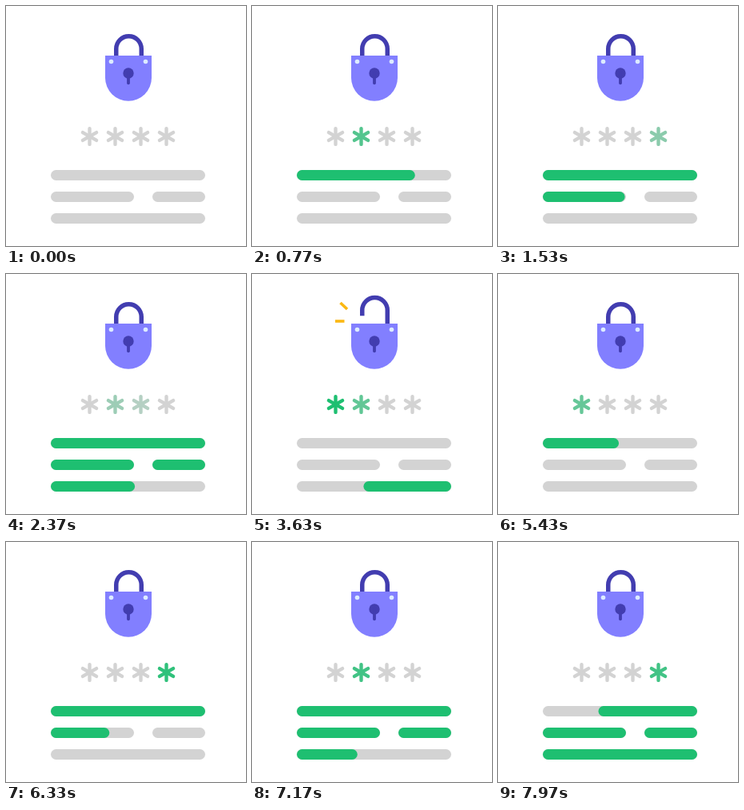
An HTML page with a canvas that plays this animation: 300x300 px, repeating every 8 s.

```html
<!DOCTYPE html>
<html lang="en">
<head>
<meta charset="utf-8">
<title>Password unlock</title>
<style>
  html, body { margin: 0; width: 100%; height: 100%; overflow: hidden; background: #fff; }
  canvas { display: block; width: 300px; height: 300px; }
</style>
</head>
<body>
<canvas id="stage"></canvas>
<script>
const LOOP = 8000, CYCLE = 149;
const GRAY = [211, 211, 211], GREEN = [30, 191, 113];
const BODY = '#827fff', DARK = '#423db0', RIVET = '#dcebff', SPARK = '#fbb813';

// Bars in reading order: start x, end x, y of the centre line
const BARS = [
  [62.5, 242.5, 211.5],
  [62.5, 153.5, 238.5],
  [189.5, 242.5, 238.5],
  [62.5, 242.5, 265.5]
];
const TOTAL = BARS.reduce((sum, [a, b]) => sum + b - a, 0);

const canvas = document.getElementById('stage');
const ctx = canvas.getContext('2d');
const dpr = window.devicePixelRatio || 1;
canvas.width = canvas.height = 300 * dpr;

const clamp = v => Math.min(1, Math.max(0, v));
const ramp = (k, from, to) => clamp((k - from) / (to - from));
const pulse = (k, peak, rise, fall) =>
  k < peak ? clamp(1 - (peak - k) / rise) : clamp(1 - (k - peak) / fall);
const smooth = u => u * u * (3 - 2 * u);
const rgb = c => `rgb(${c.map(Math.round).join(',')})`;
const mix = (a, b, u) => rgb(a.map((v, i) => v + (b[i] - v) * u));

function bezier(u, x1, y1, x2, y2) {
  const at = (t, a, b) => 3 * (1 - t) ** 2 * t * a + 3 * (1 - t) * t * t * b + t ** 3;
  let lo = 0, hi = 1;
  for (let i = 0; i < 20; i++) {
    const mid = (lo + hi) / 2;
    if (at(mid, x1, x2) < u) lo = mid; else hi = mid;
  }
  return at(hi, y1, y2);
}

function line(x1, y1, x2, y2, width, color, cap = 'round') {
  ctx.lineWidth = width;
  ctx.strokeStyle = color;
  ctx.lineCap = cap;
  ctx.beginPath();
  ctx.moveTo(x1, y1);
  ctx.lineTo(x2, y2);
  ctx.stroke();
}

function dot(x, y, r, color) {
  ctx.fillStyle = color;
  ctx.beginPath();
  ctx.arc(x, y, r, 0, Math.PI * 2);
  ctx.fill();
}

// One green stroke runs through all bars; its tail follows later.
function drawBars(k) {
  const head = TOTAL * ramp(k, 0, 86);
  const tail = k <= 86 ? 0 : k >= 126 ? TOTAL : TOTAL * bezier((k - 86) / 40, 0.25, 0.3, 0.5, 1);
  let offset = 0;
  for (const [a, b, y] of BARS) {
    line(a, y, b, y, 13, rgb(GRAY));
    const from = Math.max(a, a + tail - offset);
    const to = Math.min(b, a + head - offset);
    if (to > from) line(from, y, to, y, 13, rgb(GREEN));
    offset += b - a;
  }
}

function starGlow(i, k) {
  const first = pulse(k, 10 + 10 * i, 5, 10);
  const second = pulse(k, 52 + 12 * i, 6, 10);
  const accepted = ramp(k, 98 + 6 * i, 106 + 6 * i) * (1 - ramp(k, 138, 148));
  return Math.max(first, second, accepted);
}

function drawStars(k) {
  for (let i = 0; i < 4; i++) {
    const x = 104.5 + 32 * i, y = 163;
    const color = mix(GRAY, GREEN, starGlow(i, k));
    for (let j = 0; j < 3; j++) {
      const angle = Math.PI / 2 + j * Math.PI / 3;
      const dx = 9.9 * Math.cos(angle), dy = 9.9 * Math.sin(angle);
      line(x - dx, y - dy, x + dx, y + dy, 4.4, color);
    }
  }
}

function drawLock(k) {
  const open = smooth(ramp(k, 99, 105)) * (1 - smooth(ramp(k, 140, 151)));
  const lift = 8.2 * open;
  const cy = 53.5 - lift;

  ctx.lineWidth = 5.5;
  ctx.strokeStyle = DARK;
  ctx.lineCap = 'butt';
  ctx.beginPath();
  ctx.moveTo(137.75, 63 - 10.7 * open);
  ctx.arc(153.5, cy, 15.75, Math.PI, 0);
  ctx.lineTo(169.25, 64);
  ctx.stroke();

  ctx.fillStyle = BODY;
  ctx.beginPath();
  ctx.moveTo(124, 62);
  ctx.lineTo(182, 62);
  ctx.arc(153, 89.7, 29, 0, Math.PI);
  ctx.closePath();
  ctx.fill();

  dot(131.5, 69.5, 2.8, RIVET);
  dot(174.5, 69.5, 2.8, RIVET);
  dot(153, 84, 6.7, DARK);
  line(153, 84, 153, 96.3, 3.8, DARK);
}

function drawSparks(k) {
  const head = ramp(k, 101, 107), tail = ramp(k, 112, 118);
  if (head <= tail) return;
  const ray = (x, y, dx, dy) =>
    line(x + dx * tail, y + dy * tail, x + dx * head, y + dy * head, 3.6, SPARK, 'butt');
  ray(119, 44, -8.5, -8);
  ray(115.5, 59, -11.5, 0);
}

function draw(now) {
  const k = Math.floor((now % LOOP) * 0.03 + 0.15);
  const phase = k % CYCLE;
  ctx.setTransform(dpr, 0, 0, dpr, 0, 0);
  ctx.fillStyle = '#fff';
  ctx.fillRect(0, 0, 300, 300);
  drawBars(phase);
  drawStars(phase);
  drawLock(k);
  drawSparks(k);
}

const start = performance.now();
function tick() {
  draw(performance.now() - start);
  requestAnimationFrame(tick);
}
tick();
</script>
</body>
</html>
```
